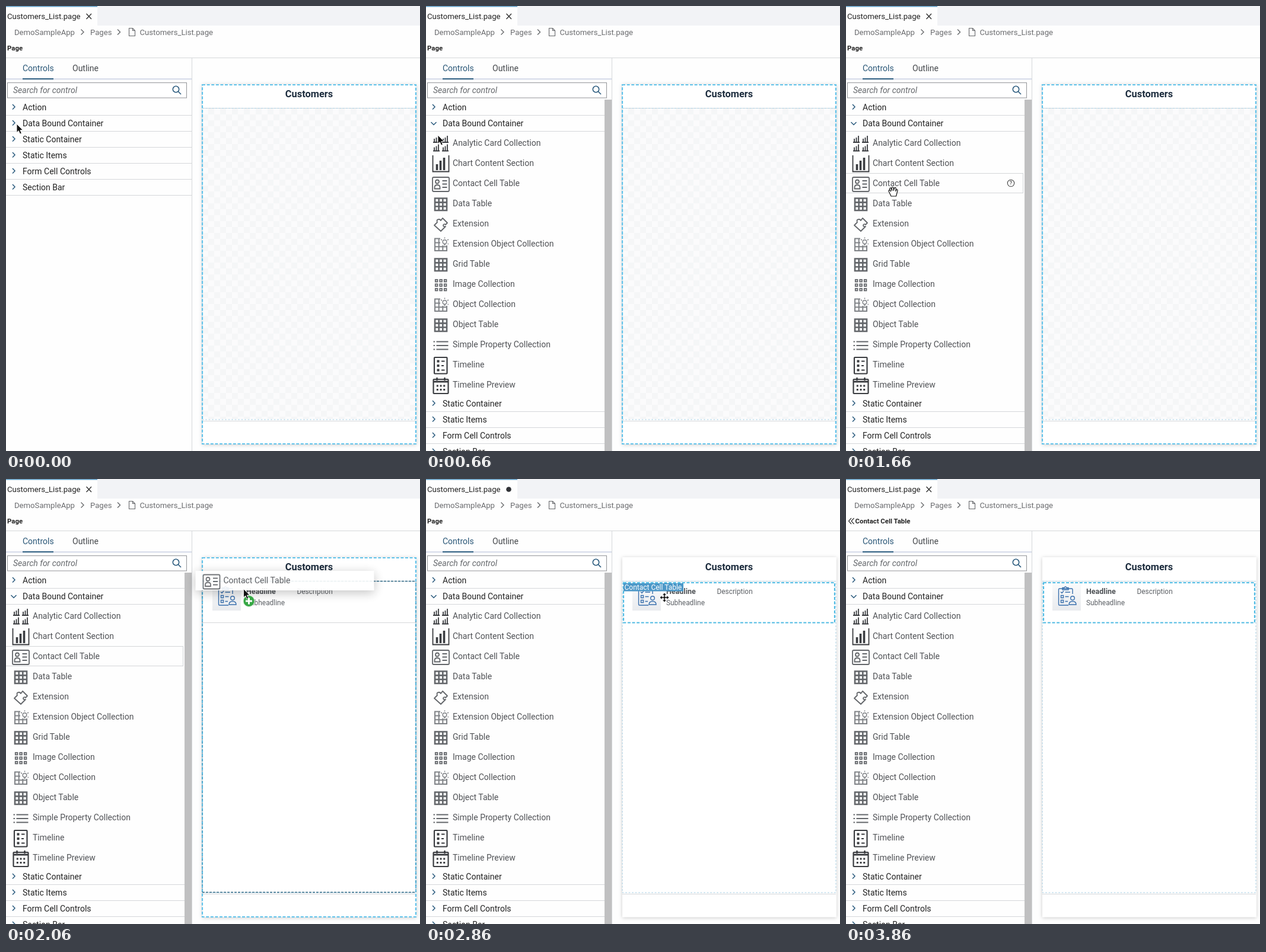
Animation, 698 px wide and 751 px high, one loop 4460 ms. Source, as an HTML page:

```html
<!DOCTYPE html>
<html lang="en">
<head>
<meta charset="utf-8">
<title>Page editor</title>
<style>
  html, body { margin: 0; width: 100%; height: 100%; overflow: hidden; background: #fefefe; }
  svg { display: block; }
  text { font: 14px Roboto, sans-serif; fill: #222; white-space: pre; }
  .crumb { font-size: 13.15px; fill: #6c6d70; }
  .item { fill: #505256; }
  .small { font-size: 11.9px; fill: #5d6166; }
  .title { font-weight: 700; font-size: 11.4px; }
  .line { stroke: #d5d7da; fill: none; }
  .chev { stroke: #2b5b7e; stroke-width: 1.5; fill: none; }
  .ico { stroke: #63666a; stroke-width: 1.8; fill: none; }
  .dark { stroke: #3a3c40; }
  .soft { stroke: #808387; stroke-width: 1.5; }
  .dash { fill: none; stroke: #62c3ea; stroke-width: 2.2; stroke-dasharray: 5 2.6; }
  .faint { fill: none; stroke: #a9cfe3; stroke-dasharray: 3 2.5; }
  .zone { fill: none; stroke: #2d6682; stroke-width: 1.6; stroke-dasharray: 4 2; }
  .shadow { filter: drop-shadow(0 1px 3px #0003); }
</style>
</head>
<body>
<svg width="698" height="751" viewBox="0 0 698 751">
  <defs>
    <pattern id="checker" x="331" y="173" width="20" height="20" patternUnits="userSpaceOnUse">
      <path fill="#f5f6f7" d="M0 0H20V20H0z"/>
      <path fill="#fbfbfc" d="M0 0H10V10H0zM10 10H20V20H10z"/>
    </pattern>
    <linearGradient id="tile" x2="0" y2="1">
      <stop stop-color="#fafbfc"/><stop offset="1" stop-color="#e9ebee"/>
    </linearGradient>

    <path id="minibars" d="M-5.5 5H5.5M-3.5 4V-1M0 4V-3M3.5 4V-6"/>
    <path id="cells" d="M-10-10.5H10V10H-10zM-10-3.6H10M-10 3.2H10M-3.3-10.5V10M3.3-10.5V10"/>
    <g id="analytic" class="ico dark">
      <use href="#minibars" x="-7.5" y="-8"/><use href="#minibars" x="7.5" y="-8"/>
      <use href="#minibars" x="-7.5" y="6.5"/><use href="#minibars" x="7.5" y="6.5"/>
    </g>
    <g id="chart" class="ico dark">
      <path d="M-13.5-15V12.5H13.5V-15"/>
      <path stroke-width="3.6" d="M-6.5 10V0M-.5 10V-6M5.5 10V-11"/>
    </g>
    <g id="contact" class="ico">
      <rect x="-14" y="-12" width="28" height="24" rx="2"/>
      <circle cx="-6" cy="-4.5" r="3"/>
      <path d="M-10.5 7.5V5Q-10.500 1-6 1T-1.500 5V7.500zM2.500-6H10.500M2.500-.5H10.500M2.500 5H10.500"/>
    </g>
    <g id="grid" class="ico"><use href="#cells" stroke-width="2.6"/></g>
    <g id="puzzle" class="ico" stroke-linejoin="round">
      <path d="M-11 1L-6-4Q-8-9-3-9Q-1-9 0-7L3-11 11-3 8 0Q5-2 4 1Q4 4 8 3L0 11z"/>
    </g>
    <g id="image" class="ico" stroke-width="2.4"></g>
    <g id="bulb" class="ico soft">
      <use href="#cells" stroke-width="2"/>
      <path d="M-1-13H14V1H-1z" fill="#fefefe" stroke="none"/>
      <circle cx="6.500" cy="-5" r="3.300"/>
      <path d="M5 0H8M6.500-12.500V-10.500M0-9L2-8M13-9L11-8M11.500-2L13-1"/>
    </g>
    <g id="list" class="ico">
      <path d="M-12.500-6.500H-10M-12.500 0H-10M-12.500 6.500H-10M-7.500-6.500H12.500M-7.500 0H12.500M-7.500 6.500H12.500"/>
    </g>
    <g id="timeline" class="ico dark">
      <rect x="-11" y="-14" width="21.500" height="27.500" rx="1" stroke-width="2.200"/>
      <path stroke-width="4" d="M-6.500-7.500H-2.500M-6.500 0H-2.500M-6.500 7.500H-2.500"/>
      <path d="M1-7.500H6.500M1 0H5M1 7.500H6.500"/>
    </g>
    <g id="calendar" class="ico dark">
      <rect x="-12.500" y="-11" width="25" height="24" rx="1" stroke-width="2.200"/>
      <path stroke-width="3" d="M-12-7H12"/>
      <path stroke-width="2.500" d="M-6.500-14V-9M6.500-14V-9"/>
      <path stroke-width="3" stroke-dasharray="3 2.700" d="M-7.200 0H7.500M-7.200 6.500H7.500"/>
    </g>
  </defs>

  <!-- header -->
  <path fill="#f2f3f6" d="M154 0H698V33H154z"/>
  <path stroke="#5f9fca" stroke-width="1.6" d="M0 .8H154"/>
  <text x="2" y="22" style="font-size:13.15px">Customers_List.page</text>
  <path d="M135.500 13L144 22M144 13L135.500 22" stroke="#333" stroke-width="1.400"/>
  <g data-on="2860 3860">
    <path fill="#fefefe" d="M134 11H146V24H134z"/>
    <circle cx="139.500" cy="17.500" r="4.300" fill="#303236"/>
  </g>
  <text class="crumb" x="14" y="48.500">DemoSampleApp</text>
  <text class="crumb" x="142" y="48.500">Pages</text>
  <text class="crumb" x="225.500" y="48.500">Customers_List.page</text>
  <path fill="none" stroke="#66686b" stroke-width="1.400" d="M126.500 39.500L131 44 126.500 48.500M188 39.500L192.500 44 188 48.500"/>
  <path fill="none" stroke="#66686b" stroke-width="1.100" d="M207.500 37.500H213.500L217.500 41.500V50.500H207.500zM213.500 37.500V41.500H217.500"/>
  <text data-on="0 3060" class="title" x="2" y="75">Page</text>
  <g data-on="3060 4460">
    <path fill="none" stroke="#333" stroke-width="1.200" d="M9 66L4.500 71 9 76M13.500 66L9 71 13.500 76"/>
    <text class="title" x="15.500" y="75">Contact Cell Table</text>
  </g>
  <path class="line" d="M0 87.500H698M313.500 88V751"/>

  <!-- control palette -->
  <text x="28" y="109.500" style="fill:#2b5878">Controls</text>
  <text x="112" y="109.500" style="fill:#45484c">Outline</text>
  <path stroke="#d3d9e8" stroke-width="2" d="M0 123.300H313"/>
  <path stroke="#2f5f82" stroke-width="2.200" d="M28 123H80"/>
  <rect x="2.500" y="129.500" width="302" height="25.500" fill="#fff" stroke="#939599"/>
  <text x="12" y="146.500" style="fill:#66696d;font-style:italic">Search for control</text>
  <g fill="none" stroke="#2b5b7e" stroke-width="1.600"><circle cx="286.500" cy="140.500" r="5.200"/><path d="M290.300 144.300L295 149"/></g>
  <g data-on="0 660" id="collapsed"></g>
  <g data-on="660 4460" id="expanded"></g>
  <g id="hover">
    <rect x="-1" y="282.500" width="299.500" height="33" fill="none" stroke="#d4d6d9"/>
    <g data-on="0 1860">
      <circle cx="278" cy="299" r="5.700" fill="none" stroke="#444" stroke-width="1.100"/>
      <text x="278" y="302.300" text-anchor="middle" style="font-size:9px">?</text>
    </g>
  </g>

  <!-- page preview -->
  <rect class="shadow" x="331" y="132" width="361" height="607.500" fill="#fff"/>
  <path class="line" d="M331 172.500H691M331 700.500H691"/>
  <rect data-on="0 2060" x="331" y="173" width="360" height="524" fill="url(#checker)"/>
  <rect class="faint" x="331" y="172.500" width="360" height="525.500"/>
  <text x="511" y="153.500" text-anchor="middle" style="font-size:16.4px;font-weight:700;fill:#1d2d3e">Customers</text>
  <g data-on="2060 4460">
    <rect x="348" y="174" width="48" height="48" fill="url(#tile)"/>
    <g fill="none" stroke="#3a70ad" stroke-width="1.400">
      <path d="M375 213H360Q358.500 213 358.500 211.500V186.500Q358.500 185 360 185H380.500Q382 185 382 186.500V194M365 187V183.500H368Q370 180 372 183.500H375V187z"/>
      <path d="M362 190.500L364 192.500 367 189M369.500 191H378M362.500 196.500H366.500V200.500H362.500zM362.500 204.500H366.500V208.500H362.500zM369.500 198.500H375.500M369.500 206.500H374"/>
      <circle cx="382" cy="201" r="3.300"/><path d="M376 212Q376 206.500 382 206.500T388 212z"/>
    </g>
    <text x="405" y="193.500" style="font-size:12.5px;font-weight:700;fill:#4d5155">Headline</text>
    <text class="small" x="490.500" y="193.500">Description</text>
    <text class="small" x="405" y="212.500">Subheadline</text>
  </g>
  <path data-on="2060 2860" class="line" d="M331 242.500H691"/>
  <rect data-on="0 2860" class="dash" x="331" y="133" width="360" height="606"/>
  <path data-on="1860 2860" class="zone" d="M331 172.500H691M331 697.500H691"/>
  <path data-on="1860 2860" class="zone" style="stroke-width:1;opacity:.6" d="M331 173V697M691 173V697"/>
  <rect data-on="2860 4460" class="dash" style="stroke:#50bbe3" x="333" y="175" width="356" height="67.500"/>
  <g data-on="2860 3260">
    <rect x="333" y="176" width="101" height="13.500" fill="#4d98c8"/>
    <text x="334.500" y="187" style="font-size:12px;fill:#fff">Contact Cell Table</text>
  </g>

  <!-- dragged control and pointers -->
  <g id="ghost" opacity=".9">
    <rect x="-2" y="282.500" width="301" height="33" fill="#fff" style="filter:drop-shadow(0 4px 9px #0004)"/>
    <use href="#contact" x="25" y="301"/>
    <text class="item" x="45" y="303.500">Contact Cell Table</text>
  </g>
  <g id="pointer">
    <g id="plus">
      <circle cx="9" cy="20.500" r="9.500" fill="#36a744" stroke="#d9eedb"/>
      <path stroke="#fff" stroke-width="3" d="M3.500 20.500H14.500M9 15V26"/>
    </g>
    <path id="arrow" fill="#111" stroke="#fff" stroke-width=".9" d="M0 0V14.500L3.300 11.500 5.600 17 8.300 15.900 6 10.500H10.500z"/>
    <path id="hand" fill="#fff" stroke="#111" stroke-width="1.200" stroke-linejoin="round"
      d="M-3 8L-7-.5Q-7.500-3-5-2L-3.500 0-5.500-4.500Q-5-7-3-5.500L-1.500-1.500-2-6.500Q-.5-8.500 1-6.500L1.300-1.500 2.500-6Q4.500-7.500 5.300-5.500L4.800-.5 6-3Q8-4 8-1.500L5.500 8z"/>
    <path id="move" fill="#111" stroke="#fff" stroke-width=".8"
      d="M0-8L3.500-4H1.200V-1.200H4V-3.500L8 0 4 3.500V1.200H1.200V4H3.500L0 8-3.500 4H-1.200V1.200H-4V3.500L-8 0-4-3.500V-1.200H-1.200V-4H-3.500z"/>
  </g>
</svg>
<script>
const LOOP = 4460;
const $ = id => document.getElementById(id);
const show = (el, on) => el.setAttribute('display', on ? 'inline' : 'none');

const groups = ['Action', 'Data Bound Container', 'Static Container', 'Static Items', 'Form Cell Controls', 'Section Bar'];
const controls = [
  ['analytic', 'Analytic Card Collection'], ['chart', 'Chart Content Section'],
  ['contact', 'Contact Cell Table'], ['grid', 'Data Table'],
  ['puzzle', 'Extension'], ['bulb', 'Extension Object Collection'],
  ['grid', 'Grid Table'], ['image', 'Image Collection'],
  ['bulb', 'Object Collection'], ['grid', 'Object Table'],
  ['list', 'Simple Property Collection'], ['timeline', 'Timeline'],
  ['calendar', 'Timeline Preview']
];

const groupRow = (name, y, width, open) => `
  <path class="chev" d="${open ? `M8.5 ${y - 2}l4.5 4.5 4.5-4.5` : `M11 ${y - 5}l4 4.2-4 4.2`}"/>
  <text x="28" y="${y + 4.5}">${name}</text>
  <path class="line" d="M0 ${y + 13.5}H${width}"/>`;

const controlRow = ([icon, name], i) => `
  <use href="#${icon}" x="25" y="${233 + 34 * i}"/>
  <text class="item" x="45" y="${235.5 + 34 * i}">${name}</text>`;

$('image').innerHTML = Array.from({ length: 9 }, (_, i) =>
  `<rect x="${i % 3 * 7.5 - 9.2}" y="${(i / 3 | 0) * 7.5 - 9.2}" width="3.6" height="3.6"/>`).join('');
$('collapsed').innerHTML = groups.map((g, i) => groupRow(g, 171 + 27 * i, 313)).join('');
$('expanded').innerHTML = groups.map((g, i) => groupRow(g, 171 + 27 * i + (i > 1 ? 446 : 0), 301, i === 1)).join('')
  + controls.map(controlRow).join('')
  + '<path fill="#c0c0c1" d="M301 158H313V751H301z"/>';

// start time, x, y, pointer, hovered row
const moves = [
  [0, 18, 199, 'arrow'], [660, 20, 218, 'arrow'],
  [860, 27, 229, 'hand', 0], [1060, 40, 246, 'hand', 0], [1260, 57, 272, 'hand', 1],
  [1460, 74, 304, 'hand', 2], [1660, 79, 313, 'hand', 2],
  [1860, 104, 303, 'arrow', 2], [2060, 400.5, 185.5, 'plus', 2], [2260, 400.5, 191, 'plus', 2],
  [2460, 401, 198.5, 'plus', 2], [2660, 401, 200, 'plus', 2],
  [2860, 402, 200, 'move'], [3260, 402, 200, 'none']
];
const timed = [...document.querySelectorAll('[data-on]')].map(el => [el, ...el.dataset.on.split(' ').map(Number)]);

function draw(now) {
  const t = now % LOOP;
  for (const [el, from, to] of timed) show(el, t >= from && t < to);

  const [, x, y, kind, row] = moves.findLast(m => t >= m[0]);
  $('pointer').setAttribute('transform', `translate(${x} ${y})`);
  for (const id of ['hand', 'move', 'plus']) show($(id), kind === id);
  show($('arrow'), kind === 'arrow' || kind === 'plus');

  show($('hover'), row !== undefined);
  $('hover').setAttribute('transform', `translate(0 ${34 * ((row ?? 2) - 2)})`);
  show($('ghost'), t >= 1860 && t < 2860);
  $('ghost').setAttribute('transform', `translate(${x - 79} ${y - 313})`);
  requestAnimationFrame(draw);
}
requestAnimationFrame(draw);
</script>
</body>
</html>
```
